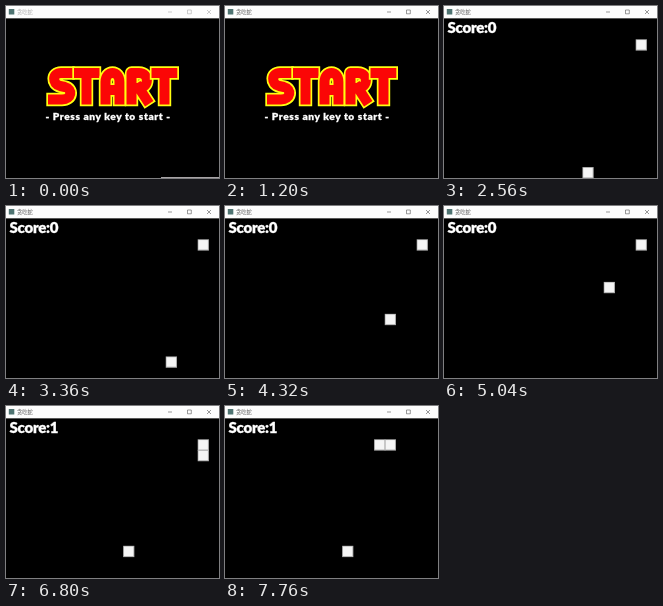
Animation, 213 px wide and 172 px high, one loop 8 s. Source, as an HTML page:

```html
<!DOCTYPE html>
<html lang="zh">
<head>
<meta charset="utf-8">
<title>贪吃蛇</title>
<style>
  html, body { margin: 0; width: 100%; height: 100%; overflow: hidden; background: #000; }
  svg { display: block; width: 100%; height: 100%; }
  .caption { font: 5.2px "Noto Sans CJK SC", "Noto Sans CJK", sans-serif; }
  .heavy { font-family: Lato, sans-serif; font-weight: 900; fill: #fff; stroke: #fff; stroke-width: .3; }
  .prompt { font-size: 10.2px; letter-spacing: .58px; }
  .score { font-size: 15px; letter-spacing: -.25px; }
  .letter path { fill: none; stroke-linecap: square; stroke-linejoin: round; }
  .rim { stroke: #ffff10; stroke-width: 13.4; }
  .core { stroke: #fb0606; stroke-width: 10; }
  .buttons { fill: none; stroke-width: .6; }
</style>
</head>
<body>
<svg viewBox="0 0 213 172" preserveAspectRatio="none">
  <rect width="213" height="172"/>
  <g id="intro">
    <g id="logo" role="img" aria-label="START"></g>
    <text class="heavy prompt" x="39.5" y="113.8">- Press any key to start -</text>
    <path id="edge" d="M155 171.5H213" stroke="#a8a4a6"/>
  </g>
  <g id="game">
    <text id="score" class="heavy score" x="3.5" y="27.3">Score:0</text>
    <g id="cells"></g>
  </g>
  <rect width="213" height="12.35" fill="#fdfdfd"/>
  <rect x="2.8" y="3" width="5.5" height="5.5" fill="#4f7472"/>
  <g id="chrome">
    <text class="caption" x="11" y="7.8">贪吃蛇</text>
    <path class="buttons" stroke="currentColor" d="M162 6H166M181.5 4H185.3V7.8H181.5ZM201 4L205 8M205 4L201 8"/>
  </g>
</svg>
<script>
const LOOP = 8000, PLAY = 2560, FOCUS = 960, EATEN = 6800;
const CELL = 10.65, TOP = 12;
const NS = 'http://www.w3.org/2000/svg';
const $ = id => document.getElementById(id);

function add(parent, tag, attrs) {
  const el = document.createElementNS(NS, tag);
  for (const key in attrs) el.setAttribute(key, attrs[key]);
  return parent.appendChild(el);
}

const letters = [
  'M62 67H55C46 67 46 78 54 80L59 81C67 83 66 93.5 56 93.5H47',
  'M73 67H88.5M80.5 67V93.5',
  'M99.5 93.5V76C99.5 64 113.5 64 113.5 76V93.5M99.5 84H113.5',
  'M125.5 93.5V67H133C144 67 143 82 133 82H128M133 82L140.5 93.5',
  'M150.5 67H166.3M158.5 67V93.5'
];
for (const d of letters) {
  const g = add($('logo'), 'g', { class: 'letter' });
  add(g, 'path', { class: 'rim', d });
  add(g, 'path', { class: 'core', d });
}

// Head path: one direction per move, with the time of each move.
const start = [13, 14], firstFood = [18, 2], nextFood = [11, 12];
const turns = 'RRUUUUUUUURRRUUUULLLL';
const times = [2800, 3040, 3360, 3600, 3840, 4080, 4320, 4560, 4800, 5040,
  5360, 5600, 5840, 6080, 6320, 6560, 6800, 7040, 7360, 7520, 7760];
const dirs = { R: [1, 0], L: [-1, 0], U: [0, -1] };
const trail = [start];
for (const turn of turns) {
  const [x, y] = trail[trail.length - 1], [dx, dy] = dirs[turn];
  trail.push([x + dx, y + dy]);
}

const blocks = [0, 1, 2].map(() => {
  const g = add($('cells'), 'g', {});
  add(g, 'rect', { width: 11.2, height: 11.3, fill: '#b4b4b4' });
  add(g, 'rect', { x: .8, y: .8, width: 9.4, height: 9.4, fill: '#f5f5f5' });
  return g;
});

function place(block, cell) {
  block.style.display = cell ? '' : 'none';
  if (cell) block.setAttribute('transform',
    `translate(${cell[0] * CELL} ${TOP + cell[1] * CELL})`);
}

const show = (id, on) => { $(id).style.display = on ? '' : 'none'; };

function draw(t) {
  const playing = t >= PLAY, focused = t >= FOCUS, eaten = t >= EATEN;
  show('intro', !playing);
  show('game', playing);
  show('edge', !focused);
  $('chrome').style.color = $('chrome').style.fill = focused ? '#555' : '#aaa';
  if (!playing) return;
  const step = times.filter(time => time <= t).length;
  $('score').textContent = 'Score:' + (eaten ? 1 : 0);
  place(blocks[0], eaten ? nextFood : firstFood);
  place(blocks[1], eaten ? trail[step - 1] : null);
  place(blocks[2], trail[step]);
}

const origin = performance.now();
function tick() {
  draw((performance.now() - origin) % LOOP);
  requestAnimationFrame(tick);
}
tick();
</script>
</body>
</html>
```
